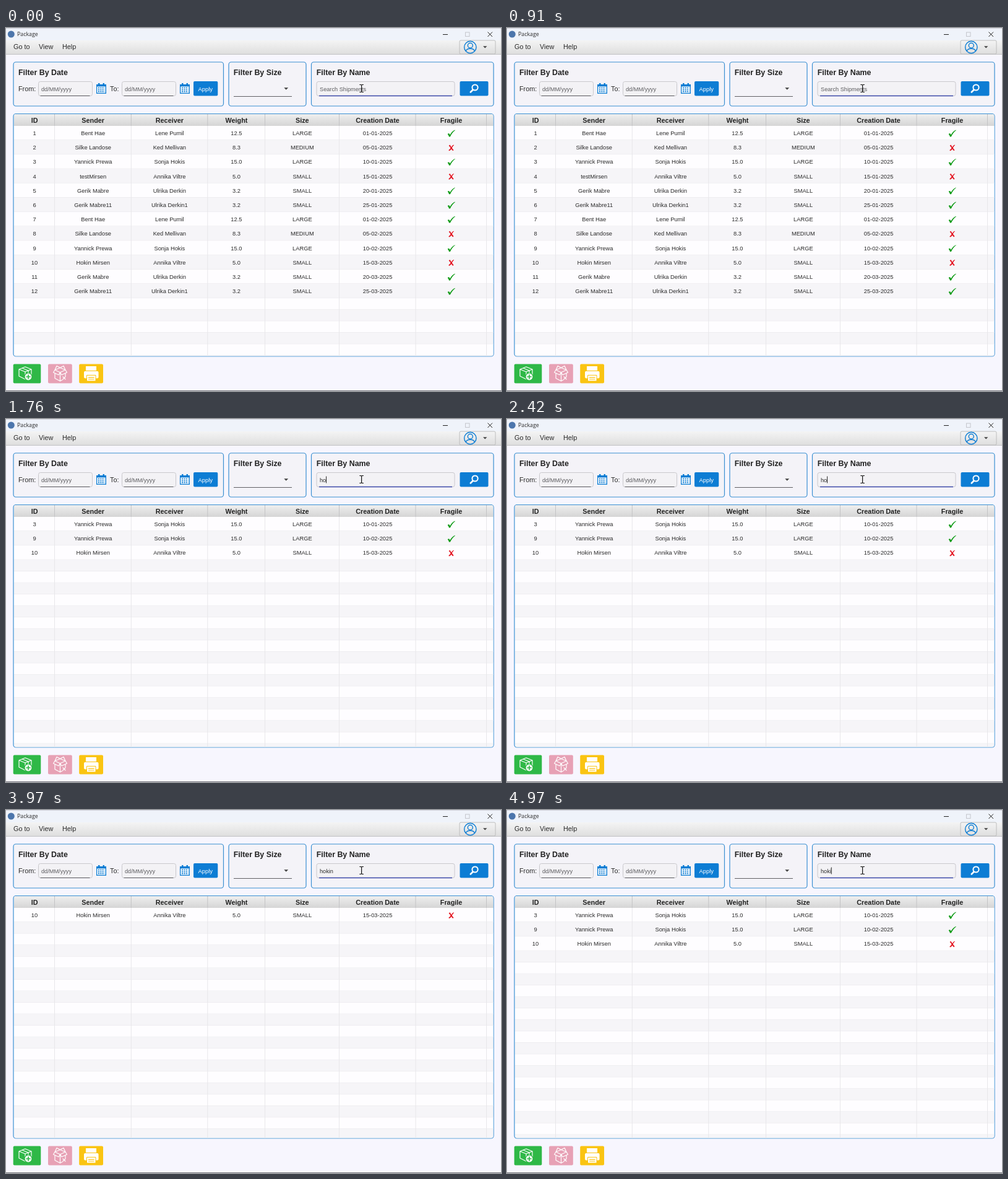
Recreate the animation shown at these times as an HTML page. Size 800 px wide and 586 px high, loop 5000 ms.

```html
<!DOCTYPE html>
<html lang="en">
<head>
<meta charset="utf-8">
<title>Package</title>
<style>
  html, body { margin: 0; width: 100%; height: 100%; overflow: hidden; background: #f7f6fe; }
  svg { display: block; width: 800px; height: 586px; font-family: "Liberation Sans", Arial, sans-serif; fill: #2b2b2b; }
  .cell { font-size: 9.33px; text-anchor: middle; }
  .head { font-size: 10.85px; font-weight: bold; text-anchor: middle; fill: #222; }
  .title { font-size: 12.4px; font-weight: bold; fill: #222; }
  .label { font-size: 10.85px; }
  .hint { font-size: 9.2px; fill: #5c5c5f; }
  .line { fill: none; stroke: #fff; stroke-width: 1.2; stroke-linejoin: round; stroke-linecap: round; }
</style>
</head>
<body>
<svg viewBox="0 0 800 586">
  <defs>
    <linearGradient id="bar" x2="0" y2="1"><stop stop-color="#f4f4f4"/><stop offset="1" stop-color="#dedede"/></linearGradient>
    <linearGradient id="header" x2="0" y2="1"><stop stop-color="#efefef"/><stop offset="1" stop-color="#d5d5d5"/></linearGradient>
    <clipPath id="inside"><rect x="13" y="139" width="774.5" height="390.5" rx="3"/></clipPath>
    <path id="check" fill="#0a9a12" d="M-6 .8L-3.5 0L-2 2.3C0-1 3-4.5 6-5.5L6.2-4.9C3-2.5 0 1.5-1.6 5.3H-3.6C-4 3.5-5 2-6 .8Z"/>
    <path id="cross" fill="#e3101d" d="M-4-3.4L-2.2-4.8C-1.2-3.4-.4-2 .1-.9C1.2-3 2.6-4.6 4.2-4.8L4.3-3.9C3-3 2-1.5 1.3.1C2 1.5 3 2.8 4 3.6L2.6 5C1.6 4 .8 2.9.1 1.9C-.8 3.6-2 4.8-3.6 5L-4.2 3.6C-3 3-2 1.8-1 .4C-1.8-1.2-3-2.6-4-3.4Z"/>
    <g id="calendar">
      <path fill="#0d7dd4" d="M0 2H16V17H0ZM3 0H5.5V3H3ZM10.5 0H13V3H10.5Z"/>
      <path fill="#fff" d="M1.3 5.5H14.7V15.7H1.3Z"/>
      <path fill="none" stroke="#0d7dd4" stroke-width="1.8" stroke-dasharray="2 1.3" d="M3 7.7H13.5M3 10.6H13.5M3 13.5H13.5"/>
    </g>
    <g id="dateField">
      <rect x=".5" y=".5" width="87" height="23" rx="3" fill="#f3f2f5" stroke="#c9c8cc"/>
      <path d="M3.5 23.5H83.5" stroke="#58585c"/>
      <text class="hint" x="5" y="15.5">dd/MM/yyyy</text>
    </g>
    <path id="box" d="M0 4L10 0L20 4V15L10 20L0 15ZM0 4L10 8L20 4M10 8V20M5 2L15 6V10"/>
  </defs>

  <rect width="800" height="586" fill="#f7f6fe"/>
  <rect width="800" height="20" fill="#eff3fa"/>
  <path d="M0 .5H800" stroke="#d3d4dc"/>
  <circle cx="8.3" cy="10" r="5.5" fill="#4c76ac"/>
  <text x="18" y="13.3" font-size="8.8" font-family="'Open Sans', 'Noto Sans', sans-serif">Package</text>
  <g fill="none" stroke="#222">
    <path d="M706 10.5H714M778.5 6.5L786 14M786 6.5L778.5 14"/>
    <rect x="742.5" y="7" width="6.5" height="6.5" stroke="#c4c6cc"/>
  </g>
  <rect y="20" width="800" height="22.5" fill="url(#bar)"/>
  <path d="M0 42.5H800" stroke="#c2c2c4"/>
  <g class="label">
    <text x="12" y="34">Go to</text><text x="53" y="34">View</text><text x="91" y="34">Help</text>
  </g>
  <rect x="733" y="20" width="58" height="22" rx="2" fill="url(#bar)" stroke="#bdbdbd"/>
  <g fill="none" stroke="#0d7dd4" stroke-width="1.4">
    <circle cx="750.3" cy="31" r="9.7"/><circle cx="750.3" cy="28.2" r="4"/>
    <path d="M743.2 37.4C744.5 31.8 756 31.8 757.4 37.4"/>
  </g>
  <path d="M771 29.3H777.4L774.2 32.6Z" fill="#444"/>

  <g fill="#f4f3f8" stroke="#3a8fd2" stroke-width="1.2">
    <rect x="12" y="55" width="339.5" height="71" rx="4"/>
    <rect x="360" y="55" width="125" height="71" rx="4"/>
    <rect x="493.5" y="55" width="294.5" height="71" rx="4"/>
    <rect x="12" y="138.5" width="776" height="391.5" rx="4" fill="#fff"/>
  </g>
  <g class="title">
    <text x="20" y="75.5">Filter By Date</text>
    <text x="367.7" y="75.5">Filter By Size</text>
    <text x="501.7" y="75.5">Filter By Name</text>
  </g>
  <text class="label" x="20" y="101.6">From:</text>
  <text class="label" x="168" y="101.6">To:</text>
  <use href="#dateField" x="52" y="86"/>
  <use href="#dateField" x="187" y="86"/>
  <use href="#calendar" x="146" y="89"/>
  <use href="#calendar" x="281" y="89"/>
  <rect x="303" y="86" width="39.3" height="23.5" rx="2" fill="#0d7dd4"/>
  <text x="322.3" y="101.5" font-size="9.4" text-anchor="middle" fill="#fff">Apply</text>
  <path d="M368 110.5H462" stroke="#606064"/>
  <path d="M449.3 96.2H456.2L452.7 99.8Z" fill="#444"/>
  <rect x="502" y="86.5" width="223" height="23" rx="3" fill="#f3f2f5" stroke="#c9c8cc"/>
  <path d="M506 109.6H721" stroke="#3c4aa8" stroke-width="1.5"/>
  <text id="query" class="hint" x="507" y="101.5"></text>
  <path id="caret" d="M0 92.5V103.5" stroke="#222"/>
  <path d="M571.3 91.5H573.5L574.6 92.3L575.7 91.5H577.9M574.6 92V103M571.3 103.5H573.5L574.6 102.7L575.7 103.5H577.9" fill="none" stroke="#111" stroke-width="1.2"/>
  <rect x="733.5" y="86" width="46" height="23.5" rx="2" fill="#0d7dd4"/>
  <circle cx="758" cy="96" r="4.6" fill="none" stroke="#fff" stroke-width="2"/>
  <path d="M754.6 99.8L750.8 103.5" stroke="#fff" stroke-width="2.6" stroke-linecap="round"/>

  <g id="table" clip-path="url(#inside)"></g>

  <rect x="11.7" y="542.5" width="44.6" height="31" rx="2" fill="#2fb847"/>
  <g class="line">
    <use href="#box" x="21" y="547"/>
    <circle cx="36" cy="563" r="6" fill="#fff" stroke="#2fb847"/>
    <path d="M36 560V566M33 563H39" stroke="#2fb847" stroke-width="1.7"/>
  </g>
  <rect x="68" y="542.5" width="38.8" height="31" rx="2" fill="#e7a1b5"/>
  <g class="line">
    <path d="M79 552L87.5 548.5L96 552L87.5 556ZM79 552L76.5 556L85 560L87.5 556L90 560L98.5 556L96 552M79 558V565.5L87.5 570L91 568M87.5 556V570M96 558V562M79 552L82 545.5L87.5 548.5L93 545.5L96 552M92 563L96 567M96 563L92 567"/>
  </g>
  <rect x="118.2" y="542.5" width="38.8" height="31" rx="2" fill="#fac412"/>
  <path d="M129 546H146V553H129Z" fill="#fff"/>
  <rect x="126" y="554" width="23.5" height="11.5" rx="2" fill="#fff"/>
  <path d="M130.5 560.5H145V570H130.5Z" fill="#fff" stroke="#fac412"/>
  <path d="M133 564.2H142.5M133 567H142.5" stroke="#fac412" stroke-width="1.2"/>
  <path d="M0 585.5H800" stroke="#77777d"/>
</svg>
<script>
const LOOP = 5000, BLINK = 500;
const ROW = 23.2, EMPTY_ROW = 18.55, TOP = 158, BOTTOM = 530;
const edges = [13, 78.5, 202.3, 325.8, 418.5, 538.5, 662, 776.5];
const headings = ["ID", "Sender", "Receiver", "Weight", "Size", "Creation Date", "Fragile"];

const parcels = [
  ["Bent Hae", "Lene Pumil", "12.5", "LARGE", true],
  ["Silke Landose", "Ked Mellivan", "8.3", "MEDIUM", false],
  ["Yannick Prewa", "Sonja Hokis", "15.0", "LARGE", true],
  ["Hokin Mirsen", "Annika Viltre", "5.0", "SMALL", false],
  ["Gerik Mabre", "Ulrika Derkin", "3.2", "SMALL", true],
  ["Gerik Mabre11", "Ulrika Derkin1", "3.2", "SMALL", true]
];
const days = ["01", "05", "10", "15", "20", "25"];
const shipments = Array.from({ length: 12 }, (_, i) => {
  const [sender, receiver, weight, size, fragile] = parcels[i % 6];
  const month = i < 6 ? "01" : i < 9 ? "02" : "03";
  return {
    cells: [i + 1, i === 3 ? "testMirsen" : sender, receiver, weight, size, `${days[i % 6]}-${month}-2025`],
    fragile
  };
});

// When the search text changes.
const keystrokes = [
  [-300, ""], [1200, "h"], [1350, "ho"], [2750, "hok"],
  [2900, "hoki"], [3050, "hokin"], [4850, "hoki"]
];

const byId = id => document.getElementById(id);
const table = byId("table"), query = byId("query"), caret = byId("caret");
const rect = (x, y, w, h, fill) => `<rect x="${x}" y="${y}" width="${w}" height="${h}" fill="${fill}"/>`;
const line = (d, color) => `<path d="${d}" stroke="${color}" fill="none"/>`;
const center = col => (edges[col] + edges[col + 1]) / 2 + .3;
const text = (kind, col, y, value) => `<text class="${kind}" x="${center(col)}" y="${y}">${value}</text>`;

function tableMarkup(search) {
  const found = shipments.filter(({ cells }) =>
    `${cells[1]} ${cells[2]}`.toLowerCase().includes(search));
  let out = "", y = TOP;
  for (let i = 0; y < BOTTOM; i++) {
    const item = found[i], height = item ? ROW : EMPTY_ROW;
    out += rect(13, y, 775, height, i % 2 ? "#f6f5f8" : "#fefdff");
    out += line(`M13 ${y + height - .5}H788`, "#eeedf0");
    if (item) {
      const middle = y + ROW / 2;
      out += item.cells.map((value, col) => text("cell", col, middle + 3.4, value)).join("");
      out += `<use href="#${item.fragile ? "check" : "cross"}" x="${center(6)}" y="${middle + .5}"/>`;
    }
    y += height;
  }
  out += rect(13, 139, 775, 19, "url(#header)");
  out += headings.map((name, col) => text("head", col, 152.8, name)).join("");
  for (const x of edges.slice(1)) {
    out += line(`M${x} 158V530`, "#e8e7ea") + line(`M${x} 139V158`, "#c3c3c5");
  }
  return out;
}

let shown = null;
function showSearch(search) {
  if (search === shown) return;
  shown = search;
  table.innerHTML = tableMarkup(search);
  query.textContent = search || "Search Shipments";
  query.style.fill = search ? "#2b2b2b" : "";
  const end = search ? query.getComputedTextLength() : 0;
  caret.setAttribute("transform", `translate(${507.4 + end} 0)`);
}

function draw(time) {
  const [since, search] = keystrokes.filter(([at]) => at <= time).pop();
  showSearch(search);
  const phase = Math.floor((time - since) / BLINK) % 2;
  caret.style.opacity = phase === (search ? 0 : 1) ? 1 : 0;
}

const start = performance.now();
function tick() {
  draw((performance.now() - start) % LOOP);
  requestAnimationFrame(tick);
}
tick();
</script>
</body>
</html>
```
